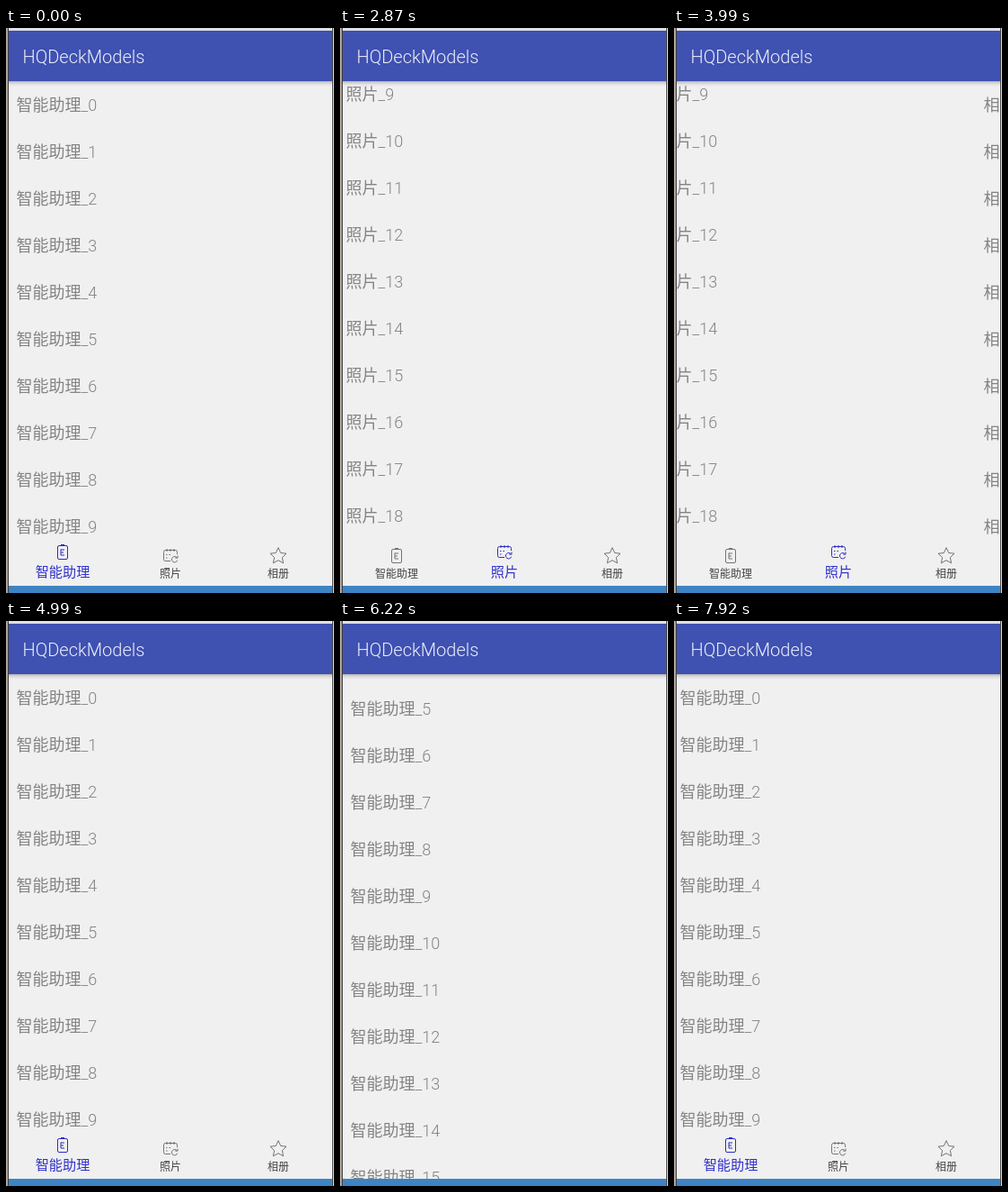
An HTML page that plays this animation: 365 by 627 pixels, repeating every 8 s.

```html
<!DOCTYPE html>
<html lang="zh-CN">
<head>
<meta charset="utf-8">
<title>Tabs</title>
<style>
  html, body { margin: 0; width: 100%; height: 100%; overflow: hidden; background: #f0f0f0; }
  svg { display: block; width: 365px; height: 627px; }
  text { font-family: Roboto, "Noto Sans CJK SC", "Noto Sans CJK", sans-serif; font-weight: 300; }
  .title { font-size: 20px; fill: #eceef8; }
  .row { font-size: 18px; fill: #848484; }
  .tab { fill: none; stroke: #666; stroke-width: .9; stroke-linejoin: round; }
  .tab text { font-size: 12px; fill: #444; stroke: none; text-anchor: middle; }
  .tab.on { stroke: #2c2cc8; stroke-width: 1; }
  .tab.on text { font-size: 15.2px; fill: #3030cc; transform: translateY(-.7px); }
  .tab.on .icon { transform: translateY(-4px); }
</style>
</head>
<body>
<svg viewBox="0 0 365 627">
  <defs>
    <clipPath id="view"><path d="M3 59h360v560H3z"/></clipPath>
    <linearGradient id="shade" x2="0" y2="1">
      <stop stop-color="#000" stop-opacity=".24"/>
      <stop offset=".5" stop-color="#000" stop-opacity=".07"/>
      <stop offset="1" stop-color="#000" stop-opacity="0"/>
    </linearGradient>
  </defs>
  <rect width="365" height="627" fill="#f0f0f0"/>
  <rect width="365" height="3" fill="#dfe1e4"/>
  <g clip-path="url(#view)">
    <g id="pages"></g>
    <g id="bar"><rect x="3" y="563" width="360" height="60" fill="#f0f0f0"/></g>
  </g>
  <rect x="3" y="59" width="360" height="6" fill="url(#shade)"/>
  <rect x="3" y="3" width="360" height="56" fill="#3f51b1"/>
  <text class="title" x="18.5" y="39">HQDeckModels</text>
  <rect x="3" y="619" width="360" height="8" fill="#3d84c4"/>
  <rect width="2" height="627" fill="#b3a598"/>
  <rect x="2" width="1" height="627" fill="#3a3a3a"/>
  <rect x="363" width="1" height="627" fill="#4a4a4a"/>
  <rect x="364" width="1" height="627" fill="#d5d8dc"/>
</svg>
<script>
const LOOP = 8000, PAGE_W = 360, ROW_H = 52;

const tabs = [
  { name: '智能助理', scroll: 0,
    icon: 'M-4 -7H4a1.5 1.5 0 0 1 1.5 1.5V6.5a1.5 1.5 0 0 1 -1.5 1.5H-4a1.5 1.5 0 0 1 -1.5 -1.5V-5.5a1.5 1.5 0 0 1 1.5 -1.5zM-2 -8h4M-2 -3v6.5M-2 -2.5h4M-2 .5h3M-2 3.5h4' },
  { name: '照片', scroll: 480,
    icon: 'M0 6H-5.5a2 2 0 0 1 -2 -2V-4a2 2 0 0 1 2 -2H5.5a2 2 0 0 1 2 2V-1.5M-4 -7.5v3M0 -7.5v3M4 -7.5v3M-5 -1h1.5M-1.5 -1h1.5M-5 2.5h1.5M7.3 2.4a3.2 3.2 0 1 0 .4 2.8M8 0v2.6h-2.8' },
  { name: '相册', scroll: 0,
    icon: 'M0 -8.8L2.7 -3 9 -2.3 4.4 2.1 5.6 8.3 0 5.2 -5.6 8.3 -4.4 2.1 -9 -2.3 -2.7 -3z' }
];

// start, step length, steps, page left, page reached
const swipes = [
  [1970, 100, 8, 0, 1],
  [2870, 100, 7, 1, 2],
  [3670, 80, 7, 2, 1],
  [4390, 100, 8, 1, 0],
  [7920, 100, 8, 0, 1]
];
const scrollKeys = [[5120, 0], [5420, 50], [5720, 150], [6220, 248], [6520, 262],
  [6820, 190], [7020, 103], [7320, 25], [7620, 0]];
const hideKeys = [[5320, 0], [5620, 56], [6820, 56], [6920, 28], [7020, 11], [7120, 3], [7220, 0]];

function add(parent, tag, attrs, text) {
  const el = document.createElementNS('http://www.w3.org/2000/svg', tag);
  for (const key in attrs) el.setAttribute(key, attrs[key]);
  if (text) el.textContent = text;
  return parent.appendChild(el);
}

const move = (el, x, y) => el.setAttribute('transform', `translate(${x} ${y})`);
const bar = document.getElementById('bar');
const pageRoot = document.getElementById('pages');

tabs.forEach((tab, i) => {
  tab.page = add(pageRoot, 'g', {});
  for (let n = 0; n < 30; n++)
    add(tab.page, 'text', { class: 'row', x: 11.5, y: 92 + n * ROW_H }, `${tab.name}_${n}`);
  tab.el = add(bar, 'g', { class: 'tab' });
  move(tab.el, 63 + i * 120, 585.5);
  add(tab.el, 'path', { class: 'icon', d: tab.icon });
  add(tab.el, 'text', { y: 24 }, tab.name);
});

function track(keys, t) {
  const i = keys.findIndex(key => key[0] > t);
  if (i < 0) return keys[keys.length - 1][1];
  if (i === 0) return keys[0][1];
  const [t0, a] = keys[i - 1], [t1, b] = keys[i];
  return Math.round(a + (b - a) * (t - t0) / (t1 - t0));
}

// slow drag, then a fling that settles
const fling = u => 1 - Math.pow(1 - Math.pow(u, 3.25), 6.36);

function pager(t) {
  let x = 0, active = 0;
  for (const [start, step, count, from, to] of swipes) {
    if (t < start) break;
    const u = Math.min(1, (Math.floor((t - start) / step) + 1) / count);
    const p = fling(u);
    const shift = Math.max(5, Math.round(PAGE_W * p));
    x = from * PAGE_W + (to - from) * shift;
    active = p > 0.3 ? to : from;
  }
  return { x, active };
}

function draw() {
  const t = performance.now() % LOOP;
  const held = Math.floor((t - 20) / 100) * 100 + 20;
  const { x, active } = pager(t);
  tabs.forEach((tab, i) => {
    const scroll = i === 0 ? track(scrollKeys, held) : tab.scroll;
    move(tab.page, i * PAGE_W - x, -scroll);
    tab.el.classList.toggle('on', i === active);
  });
  move(bar, 0, track(hideKeys, held));
  requestAnimationFrame(draw);
}
draw();
</script>
</body>
</html>
```
